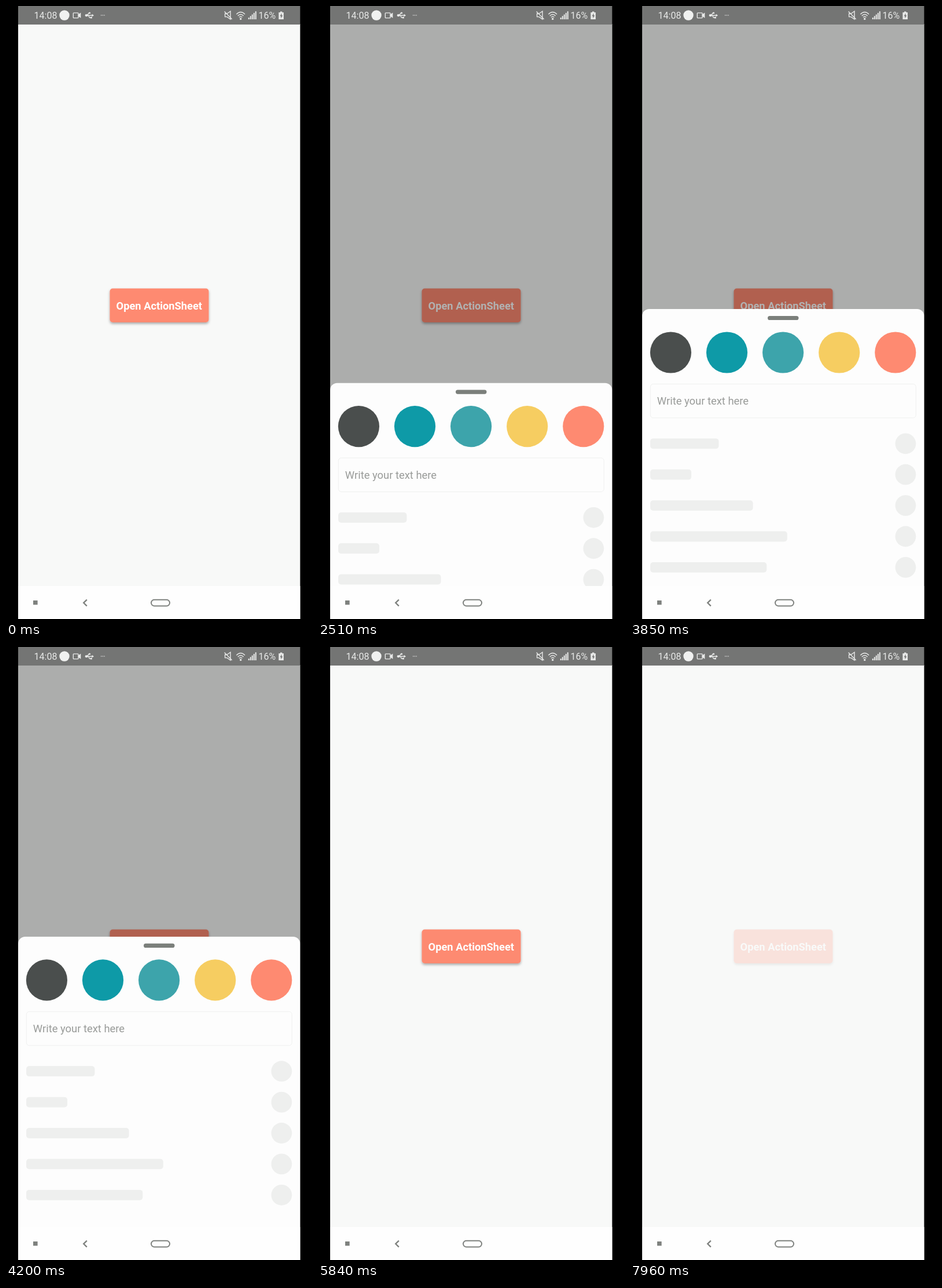
Write an HTML page that moves like this. It is 529 px wide and 1058 px high and loops after 8000 ms.

```html
<!DOCTYPE html>
<html lang="en">
<head>
<meta charset="utf-8">
<title>Bottom sheet</title>
<style>
  html, body { margin: 0; width: 100%; height: 100%; overflow: hidden; background: #000; }
  svg { display: block; width: 100%; height: 100%; }
  text { font-family: Roboto, "Noto Sans", sans-serif; }
</style>
</head>
<body>
<svg viewBox="0 0 529 1058" xmlns="http://www.w3.org/2000/svg">
  <defs>
    <clipPath id="screen"><rect x="21" y="32" width="487.5" height="969"/></clipPath>
    <filter id="shadow" x="-10%" y="-20%" width="120%" height="150%">
      <feDropShadow dx="0" dy="2.5" stdDeviation="2.3" flood-color="#000" flood-opacity=".32"/>
    </filter>
  </defs>
  <rect width="529" height="1058" fill="#000"/>
  <rect x="21" y="31" width="487.5" height="1027" fill="#f8f9f8"/>

  <g id="button">
    <rect x="179.5" y="487.5" width="171" height="58.5" rx="5" fill="#fe8a71" filter="url(#shadow)"/>
    <text x="264.8" y="524" text-anchor="middle" font-size="18.3" font-weight="700" fill="#fff">Open ActionSheet</text>
  </g>

  <g clip-path="url(#screen)">
    <g id="modal">
      <rect x="21" y="32" width="487.5" height="969" fill="#000" opacity=".306"/>
      <g id="sheet">
        <rect x="21" width="487.5" height="1000" rx="12" fill="#fdfdfd"/>
        <rect x="238" y="11.8" width="53.5" height="7.2" rx="3.6" fill="#7b7f7b"/>
        <rect x="35.3" y="129.3" width="459" height="58.5" rx="5" fill="none" stroke="#eff0ef"/>
        <text x="46.8" y="165" font-size="18.4" fill="#999b99">Write your text here</text>
      </g>
    </g>
  </g>

  <g id="statusBar">
    <rect x="21" width="487.5" height="32" fill="#747574"/>
    <g fill="#e8e9e8">
      <text x="48.6" y="22.4" font-size="16">14:08</text>
      <text x="436.4" y="22.4" font-size="16">16%</text>
      <circle cx="101" cy="16" r="8.7" fill="#f0f1f0"/>
      <path d="M125 14.6l4.3-3v9.2l-4.3-3z"/>
      <path d="M137.6 16.2l3.4-2.2v4.4z M148.6 13.8l3.4 2.4-3.4 2.4z"/>
      <circle cx="138.8" cy="16.2" r="2.1"/>
      <rect x="146" y="18.6" width="2.8" height="2.8"/>
      <circle cx="144.6" cy="11.9" r="1.5"/>
      <g id="dots"></g>
      <g id="bars"></g>
      <path d="M474 9.5h3.4v1.6h2.6v12h-8.6v-12h2.6z"/>
      <path d="M476.6 12.6l-3 5h1.8v3.6l3-5h-1.8z" fill="#747574"/>
      <circle cx="405.7" cy="22.2" r="1.7"/>
    </g>
    <g fill="none" stroke="#e8e9e8" stroke-width="1.4">
      <rect x="116.3" y="11.9" width="8.7" height="8.7" rx=".8"/>
      <path d="M139 16.2h10 M140.8 16.2l2.2-4h1.6 M142.4 16.2l2 3.8h2"/>
      <path d="M378.6 13.2h3.4l6-4.2v13.8l-6-4.2h-3.4z M377.6 9.4l13 13.4"/>
      <path d="M398.4 14.2q7.3-7.4 14.6 0 M400.8 17q4.9-4.9 9.8 0 M403 19.6q2.7-2.7 5.4 0"/>
    </g>
  </g>

  <g id="navBar">
    <rect x="21" y="1001" width="487.5" height="57" fill="#fefefe"/>
    <rect x="47" y="1026" width="7.6" height="7.4" fill="#7e817e"/>
    <path d="M139.8 1024.6l-5.6 5.5 5.6 5.5" fill="none" stroke="#7e817e" stroke-width="2.3"/>
    <rect x="251" y="1024.8" width="32" height="10.6" rx="5.3" fill="none" stroke="#7e817e" stroke-width="2"/>
  </g>
</svg>
<script>
const LOOP = 8000;
const TAPS = [40, 5500, 7960];
const REST = 651, FULL = 500, HIDDEN = 1000;
const $ = id => document.getElementById(id);

function add(parent, tag, attrs) {
  const el = document.createElementNS("http://www.w3.org/2000/svg", tag);
  for (const key in attrs) el.setAttribute(key, attrs[key]);
  parent.appendChild(el);
}

const button = $("button"), modal = $("modal"), sheet = $("sheet");

["#4a4e4d", "#0e9aa7", "#3da4ab", "#f6cd61", "#fe8a71"].forEach((fill, i) =>
  add(sheet, "circle", { cx: 70.4 + 97.1 * i, cy: 74.9, r: 35.6, fill }));

[100, 60, 150, 200, 170].forEach((size, i) => {
  const y = 232.2 + 53.4 * i, fill = "#eeefee";
  add(sheet, "rect", { x: 35, y: y - 8.9, width: size * 1.184, height: 17.8, rx: 5, fill });
  add(sheet, "circle", { cx: 476.4, cy: y, r: 17.9, fill });
});

for (let i = 0; i < 3; i++) add($("dots"), "circle", { cx: 164.7 + 2.7 * i, cy: 16, r: 0.8 });
for (let i = 0; i < 5; i++) {
  const h = 3 + 2.7 * i;
  add($("bars"), "rect", { x: 418.8 + 3 * i, y: 23 - h, width: 2, height: h });
}

const clamp = v => Math.min(1, Math.max(0, v));
const easeInOut = p => p < 0.5 ? 2 * p * p : 1 - 2 * (1 - p) * (1 - p);

// Keys are [time, value]; linear in between.
function track(keys, t) {
  if (t <= keys[0][0]) return keys[0][1];
  for (let i = 1; i < keys.length; i++) {
    const [t0, v0] = keys[i - 1], [t1, v1] = keys[i];
    if (t <= t1) return v0 + (v1 - v0) * (t - t0) / (t1 - t0);
  }
  return keys[keys.length - 1][1];
}

// Sheet rises and bounces slightly past its resting place.
const rise = start => [
  [start, HIDDEN], [start + 60, 920], [start + 134, 810], [start + 190, 715],
  [start + 240, 661], [start + 285, 642], [start + 335, 646], [start + 394, REST]
];

const sessions = [
  {
    open: 1206, close: 4780,
    keys: [
      ...rise(1206),
      [2510, REST], [2590, 622], [2680, 545], [2740, 508], [2770, FULL],
      [3640, FULL], [3740, 508], [3850, 523], [3930, 531], [4000, 528], [4110, 508], [4200, FULL],
      [4500, FULL], [4600, 530], [4700, 582], [4780, 625], [4890, 667], [4990, 696]
    ]
  },
  {
    open: 6446, close: 7580,
    keys: [
      ...rise(6446),
      [7099, REST], [7100, 663], [7250, 705], [7420, 765], [7580, 810], [7790, 880]
    ]
  }
];

// Both fades accelerate.
const fade = (t, s) =>
  clamp((t - s.open) / 200) ** 2 * (1 - clamp((t - s.close) / 200) ** 2);

function pressOpacity(t) {
  const tap = TAPS.filter(s => s <= t).pop();
  if (tap === undefined) return 1;
  return 0.2 + 0.8 * easeInOut(clamp((t - tap - 100) / 250));
}

function render(t) {
  const s = t < 5500 ? sessions[0] : sessions[1];
  button.setAttribute("opacity", pressOpacity(t));
  modal.setAttribute("opacity", fade(t, s));
  sheet.setAttribute("transform", `translate(0 ${track(s.keys, t)})`);
}

const begin = performance.now();
function tick() {
  render((performance.now() - begin) % LOOP);
  requestAnimationFrame(tick);
}
tick();
</script>
</body>
</html>
```
